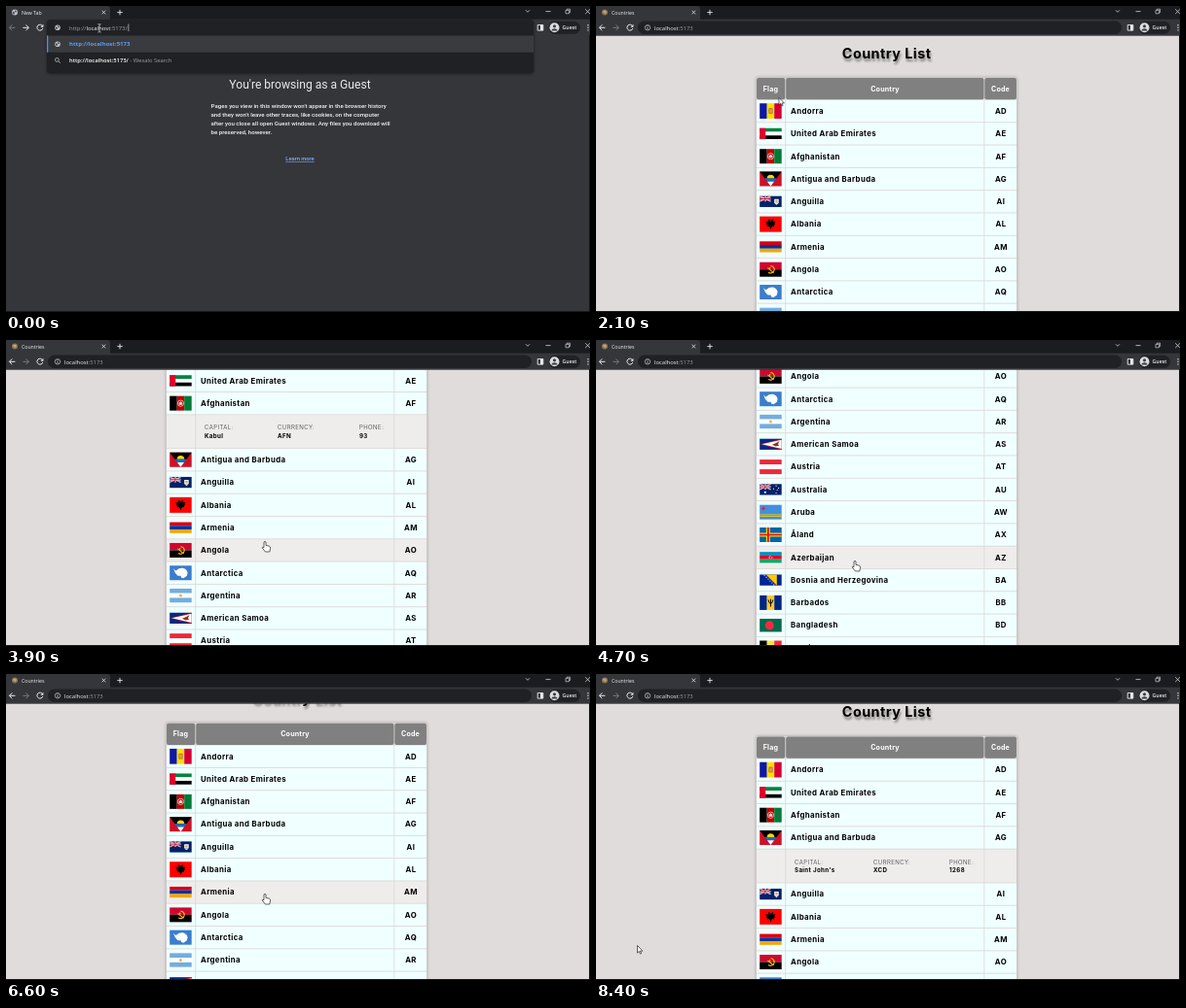
An HTML page for the animation above (8.5 s loop, 600 by 315 pixels).

```html
<!DOCTYPE html>
<html lang="en">
<head>
<meta charset="utf-8">
<title>Country List</title>
<style>
  html, body { margin: 0; width: 100%; height: 100%; overflow: hidden; background: #35363a; }
  svg { display: block; width: 100vw; height: 100vh; }
  text { white-space: pre; }
  .ui { font-family: "Open Sans", sans-serif; }
  .guest { font-family: Roboto, sans-serif; font-weight: 500; }
  .app { font-family: Inter, sans-serif; font-weight: 700; }
  .name { font-size: 7.8px; letter-spacing: .38px; }
  .head { font-size: 7.1px; letter-spacing: .2px; fill: #fff; }
  .label { font-size: 6px; letter-spacing: .45px; font-weight: 300; fill: #333; }
  .value { font-size: 6.2px; letter-spacing: .35px; }
  .title { font-size: 14.4px; letter-spacing: .45px; filter: drop-shadow(1.5px 3px 1.3px rgba(0,0,0,.42)); }
  .mid { text-anchor: middle; }
  .line { fill: none; stroke: #e8eaed; stroke-width: .9; }
</style>
</head>
<body>
<svg id="stage" viewBox="0 0 600 315" preserveAspectRatio="none"></svg>
<script>
const LOOP = 8500, ROW = 23.3, FIRST = 96.9, DETAIL = 34.8, PITCH = 13.9;
const AZURE = '#f0ffff', HOVER = '#efecec';

const rect = (fill, x, y, w, h, rx = 0) =>
  `<rect x="${x}" y="${y}" width="${w}" height="${h}" rx="${rx}" fill="${fill}"/>`;
const dot = (fill, x, y, r) => `<circle cx="${x}" cy="${y}" r="${r}" fill="${fill}"/>`;
const shape = (fill, d) => `<path d="${d}" fill="${fill}"/>`;
const line = (d, stroke = '#e8eaed', w = .9) =>
  `<path d="${d}" class="line" style="stroke:${stroke};stroke-width:${w}"/>`;
const text = (s, x, y, cls, attrs = '') => `<text x="${x}" y="${y}" class="${cls}" ${attrs}>${s}</text>`;
const ui = (s, x, y, size, fill, attrs = '') => text(s, x, y, 'ui', `font-size="${size}" fill="${fill}" ${attrs}`);
const group = (id, body) => `<g id="${id}">${body}</g>`;
const tint = (fill, s, weight = 400) => `<tspan fill="${fill}" font-weight="${weight}">${s}</tspan>`;

// Flags are 30 units wide.
const bands = (h, ...cs) => cs.map((c, i) => rect(c, 0, i * h / cs.length, 30, h / cs.length)).join('');
const pales = (h, ...cs) => cs.map((c, i) => rect(c, i * 30 / cs.length, 0, 30 / cs.length, h)).join('');
const jack = line('M0 0L15 7.5M15 0L0 7.5', '#fff', 1.6) + line('M0 0L15 7.5M15 0L0 7.5', '#c8102e', .6) +
  line('M7.5 0V7.5M0 3.75H15', '#fff', 2.4) + line('M7.5 0V7.5M0 3.75H15', '#c8102e', 1.3);
const navy = '#012169';

const countries = [
  ['Andorra', 'AD', 21, pales(21, '#10189f', '#fedd00', '#d50032') + rect('#b5803c', 12, 6.5, 6, 8, 1.5) + rect('#d9a441', 13.3, 8, 3.4, 5)],
  ['United Arab Emirates', 'AE', 15, bands(15, '#00843d', '#fff', '#000') + rect('#e4002b', 0, 0, 8, 15)],
  ['Afghanistan', 'AF', 20, pales(20, '#000', '#be0000', '#007a36') +
    '<circle cx="15" cy="10" r="4.2" fill="none" stroke="#f3d5d0" stroke-width="1"/>' + shape('#f3d5d0', 'M12.5 12V9.5L15 7.5 17.5 9.5V12Z')],
  ['Antigua and Barbuda', 'AG', 20, rect('#ce1126', 0, 0, 30, 20) + shape('#000', 'M0 0H30L23 9.3H7Z') +
    shape('#fcd116', 'M10 9.3A5 5 0 0 1 20 9.3Z') + shape('#0072c6', 'M7 9.3H23L19.7 13.7H10.3Z') + shape('#fff', 'M10.3 13.7H19.7L15 20Z')],
  ['Anguilla', 'AI', 15, rect(navy, 0, 0, 30, 15) + jack + shape('#fff', 'M20 4H26V9Q25 11 23 12Q21 11 20 9Z') +
    dot('#f09a2c', 23, 6.8, 1.7) + rect('#7fc6c9', 20.8, 9, 4.4, 1.3)],
  ['Albania', 'AL', 21.4, rect('#f00', 0, 0, 30, 21.4) +
    shape('#000', 'M15 6L12.5 4 11 5.5 12.5 7.5 8 7 10 9.5 8.5 11 11 12 10 14 13 13.5 15 18 17 13.5 20 14 19 12 21.5 11 20 9.5 22 7 17.5 7.5 19 5.5 17.5 4Z')],
  ['Armenia', 'AM', 15, bands(15, '#d90012', '#0033a0', '#f2a800')],
  ['Angola', 'AO', 20, bands(20, '#cc092f', '#000') + line('M15 5A5 5 0 1 1 12 14', '#ffcb00', 1.5) +
    line('M11 8L19 14.5', '#ffcb00', 1.4) + dot('#ffcb00', 14, 8, 1.1)],
  ['Antarctica', 'AQ', 20, rect('#3a7dce', 0, 0, 30, 20) +
    shape('#fff', 'M5 4L8 7 10 6Q12 3 18 3.3Q24 5 24.5 10L23.5 14 19 17.3 16 16.5 15 14 11 14 7.5 10Z')],
  ['Argentina', 'AR', 19, bands(19, '#74acdf', '#fff', '#74acdf') + dot('#f0b43c', 15, 9.5, 2)],
  ['American Samoa', 'AS', 15, rect('#002b7f', 0, 0, 30, 15) + shape('#ce1126', 'M30 0V15L0 7.5Z') +
    shape('#fff', 'M30 1.3V13.7L3 7.5Z') + shape('#7b3f1d', 'M17 8L21 6.5 27 3.5 25 7.5 27 9 22 10.5Z')],
  ['Austria', 'AT', 20, bands(20, '#ed2939', '#fff', '#ed2939')],
  ['Australia', 'AU', 15, rect(navy, 0, 0, 30, 15) + jack + dot('#fff', 7.5, 11.4, 1.4) +
    [[22.5, 2.5], [19, 6.5], [25.8, 5.6], [22.5, 12.4], [24, 8.3]].map(p => dot('#fff', ...p, .8)).join('')],
  ['Aruba', 'AW', 20, rect('#418fde', 0, 0, 30, 20) + rect('#ffd100', 0, 13, 30, 1.1) + rect('#ffd100', 0, 15.3, 30, 1.1) +
    shape('#d2263c', 'M5 1.5L6 4 8.5 5 6 6 5 8.5 4 6 1.5 5 4 4Z')],
  ['Åland', 'AX', 20, rect('#0064ad', 0, 0, 30, 20) + line('M11.5 0V20M0 10H30', '#ffd300', 5.4) + line('M11.5 0V20M0 10H30', '#da0e15', 2.3)],
  ['Azerbaijan', 'AZ', 15, bands(15, '#0092bc', '#e4002b', '#00ae65') + dot('#fff', 14.4, 7.5, 2) +
    dot('#e4002b', 15, 7.5, 1.6) + dot('#fff', 17, 7.5, .8)],
  ['Bosnia and Herzegovina', 'BA', 15, rect('#002395', 0, 0, 30, 15) + shape('#fecb00', 'M8.5 0H23.5V15Z') +
    [0, 1, 2, 3, 4, 5].map(i => dot('#fff', 6.5 + i * 2.6, 1 + i * 2.6, .8)).join('')],
  ['Barbados', 'BB', 20, pales(20, '#00267f', '#ffc726', '#00267f') + line('M15 5V15.5M11.8 6Q12.5 11 15 11.5Q17.5 11 18.2 6', '#000', 1.3)],
  ['Bangladesh', 'BD', 18, rect('#006a4e', 0, 0, 30, 18) + dot('#f42a41', 13.5, 9, 6)],
  ['Belgium', 'BE', 20, pales(20, '#000', '#fae042', '#ed2939')]
];

const columns = [[165, 29.3], [195.2, 203.3], [399.3, 32.7]];
const cells = (fill, y, h, rx) => columns.map(([x, w]) => rect(fill, x, y, w, h, rx)).join('');

const rowMarkup = ([name, code, h, art], i) => group('row' + i,
  group('bg' + i, cells('inherit', 0, 22.4)) +
  `<g transform="translate(168.2 ${11.2 - h * .375}) scale(.75)">${art}</g>` +
  text(name, 200, 14, 'app name') + text(code, 416, 14, 'app name mid'));

const globe = (x, y, r) => `<g transform="translate(${x} ${y}) scale(${r / 3})">` + dot('#bdc1c6', 0, 0, 3) +
  shape('#4a4b4f', 'M-2.2-1L-.4-.4 0 .8-1 2.2-2.3.8ZM.2-2.4L2 -1.2 1.2.2 0-.8Z') + '</g>';

const guestLines = [
  "Pages you view in this window won't appear in the browser history",
  "and they won't leave other traces, like cookies, on the computer",
  'after you close all open Guest windows. Any files you download will',
  'be preserved, however.'
];
const guestPage = dot('#5f6368', 302, 51, 11) + dot('#bdc1c6', 302, 48, 3.6) + shape('#bdc1c6', 'M295 58Q296 53 302 53Q308 53 309 58Z') +
  text("You're browsing as a Guest", 302, 85.3, 'guest mid', 'font-size="12.1" fill="#e8eaed" style="font-weight:400"') +
  guestLines.map((s, i) => text(s, 210.5, 105 + i * 9, 'guest', 'font-size="6.14" fill="#f1f3f4"')).join('') +
  text('Learn more', 302, 159, 'guest mid', 'font-size="5.75" fill="#7fb0fa" text-decoration="underline"');

const site = rect('#e0dcdb', 0, 30, 600, 285) +
  group('scroll', text('Country List', 0, 53.6, 'app title mid', 'id="title"') +
    group('table',
      '<rect x="164.5" y="73.5" width="268" height="640" rx="2" fill="#dcd9d8" style="filter:drop-shadow(0 0 1.5px rgba(0,0,0,.3))"/>' +
      cells('#808080', 74, 22.2, 2) + ['Flag', 'Country', 'Code'].map((s, i) => text(s, [179.5, 297, 415.5][i], 87.6, 'app head mid')).join('') +
      countries.map(rowMarkup).join('') +
      group('detail', cells(HOVER, 0, 34) +
        ['CAPITAL:', 'CURRENCY:', 'PHONE:'].map((s, i) =>
          group('col' + i, text(s, 0, 15.2, 'app label') + text('', 0, 23.5, 'app value', `id="val${i}"`))).join('')))) +
  '<clipPath id="window"><rect x="280" y="88" width="42.6" height="15"/></clipPath><g clip-path="url(#window)">' +
  group('loader', [-1, 0, 1, 2].map(i => dot('#808080', 287 + i * PITCH, 95.4, 5.9)).join('')) + '</g>';

const chrome = rect('#1b1c1f', 0, 0, 600, 14) + shape('#35363a', 'M0 14V0H104Q107 0 107 3V14Z') + rect('#35363a', 0, 13.7, 600, 17) +
  group('globeIcon', globe(9, 6.6, 3)) +
  group('earthIcon', dot('#8a7557', 9, 6.6, 3) + shape('#c0a77c', 'M7 5.4L9 4.6 11 6 9.6 8 7.6 6.8Z')) +
  group('spinner', line('M9 3.8A2.8 2.8 0 1 1 6.2 6.6', '#9aa0a6', .8)) +
  ui('', 16, 8.5, 5.2, '#f1f3f4', 'id="tab" font-weight="500"') +
  line('M98.6 4.7L102.2 8.3M102.2 4.7L98.6 8.3', '#e8eaed', .8) + line('M117 3.9V9.3M114.3 6.6H119.7') +
  line('M534 4.3L536 6.3 538 4.3M554.5 5.6H559.5M595.2 3.3L600 8.1M600 3.3L595.2 8.1', '#d0d2d5', .8) +
  line('M575 4.4H578.4V7.8H575ZM576.2 4.2V3.2H579.6V6.6H578.6', '#d0d2d5', .7) +
  group('back', line('M9.4 22.3H3.6M6.3 19.4L3.4 22.3 6.3 25.2', 'inherit', 1)) +
  group('next', line('M17.4 22.3H23.2M20.5 19.4L23.4 22.3 20.5 25.2', 'inherit', 1)) +
  group('reload', line('M37.6 20.8A3 3 0 1 0 37.8 23', '#e8eaed', 1) + shape('#e8eaed', 'M38.4 18.8V21.8H35.4Z')) +
  group('stop', line('M32.3 19.6L37.7 25M37.7 19.6L32.3 25', '#e8eaed', 1)) +
  rect('#202124', 43, 15.6, 497, 13.4, 6.7) +
  '<circle cx="53" cy="22.3" r="2.7" class="line" style="stroke-width:.6"/>' + line('M53 21.7V23.9M53 20.4V21.1', '#e8eaed', .7) +
  ui(tint('#f1f3f4', 'localhost', 500) + tint('#9aa0a6', ':5173'), 60, 24.5, 5.9, '#fff') +
  line('M546.2 19.5H551.8V25.1H546.2Z') + rect('#e8eaed', 549, 19.5, 2.8, 5.6) +
  rect('#202124', 557.5, 15.8, 32.5, 13, 6.5) + dot('#dadce0', 563.5, 22.3, 5) + dot('#3c4043', 563.5, 20.8, 1.6) +
  shape('#3c4043', 'M560.2 25.6Q560.8 23.2 563.5 23.2Q566.2 23.2 566.8 25.6Z') +
  ui('Guest', 571.6, 24.2, 5.2, '#f1f3f4', 'font-weight="600"') + [19.7, 22.3, 24.9].map(y => dot('#e8eaed', 598, y, .7)).join('');

const dropdown = '<rect x="42" y="14.3" width="500" height="54.5" rx="3" fill="#202124" style="filter:drop-shadow(0 1px 1.5px rgba(0,0,0,.5))"/>' +
  rect('#3a3b3f', 42, 30.5, 500, 17.2) + rect('#4a90f5', 42, 30.5, 1.3, 17.2) + globe(53, 22.3, 2.8) + globe(53, 39.2, 2.8) +
  ui(tint('#9aa0a6', 'http://') + tint('#f1f3f4', 'localhost', 500) + tint('#9aa0a6', ':5173/'), 65, 24.5, 5.95, '#fff') +
  rect('#e8eaed', 125.6, 18.5, .6, 7.6) +
  ui('http://localhost:5173', 65, 41.3, 6, '#5f9df8', 'font-weight="700"') +
  line('M54 57L55.8 58.8', '#bdc1c6', .8) + '<circle cx="52.4" cy="55.4" r="1.9" class="line" style="stroke:#bdc1c6;stroke-width:.8"/>' +
  ui(tint('#fff', 'http://localhost:5173/', 600) + tint('#9aa0a6', ' - Wexalo Search'), 65, 58.2, 5.85, '#fff');

const pointer = (id, d) => group(id, `<path d="${d}" fill="#fff" stroke="#222" stroke-width=".7" stroke-linejoin="round"/>`);
const cursors = pointer('hand', 'M-1 1Q0-.5 1 1V4.4L4.4 5.2Q5.8 5.6 5.6 7.2L4.8 11H.4L-2.8 6.9Q-2.6 5.4-1 6.6Z') +
  pointer('arrow', 'M0 0V7.6L1.8 6 3 8.6 4.1 8.1 3 5.6H5.4Z') +
  group('beam', line('M-1.6-3.4Q0-3.4 0-2.6Q0-3.4 1.6-3.4M0-2.8V4.4M-1.6 5Q0 5 0 4.2Q0 5 1.6 5', '#c8cacd', .8));

document.getElementById('stage').innerHTML =
  rect('#35363a', 0, 0, 600, 315) + group('guest', guestPage) + group('site', site) + chrome + group('dropdown', dropdown) +
  rect('#17181a', 0, 314, 600, 1) + rect('#17181a', 599, 30, 1, 285) + group('cursor', cursors);

const el = id => document.getElementById(id);
const show = (id, on) => el(id).style.display = on ? '' : 'none';
const move = (id, x, y) => el(id).setAttribute('transform', `translate(${x} ${y})`);

function track(keys, t) {
  const i = keys.findIndex(k => k[0] > t);
  if (i < 0) return keys.at(-1).slice(1);
  if (!i) return keys[0].slice(1);
  const a = keys[i - 1], b = keys[i], p = (t - a[0]) / (b[0] - a[0]);
  return a.slice(1).map((v, j) => v + (b[j + 1] - v) * p);
}

const mouse = [[1850, 96, 22], [2000, 140, 60], [2200, 235, 128], [2400, 274, 155], [3300, 274, 155], [3600, 266, 207],
  [4500, 266, 207], [4700, 266, 227], [6500, 266, 226], [6850, 266, 226], [7200, 290, 170], [7450, 290, 170],
  [7800, 518, 110], [7900, 518, 110], [8100, 400, 120], [8200, 290, 122], [8400, 42.5, 279.5]];
const scrolling = [[3400, 0], [3550, 20], [3750, 74], [3900, 89.5], [4000, 93.8], [4100, 93.8], [4250, 135],
  [4450, 225], [4600, 260], [4700, 268.6]];
const scrollUp = [[5900, 233.8], [6000, 218], [6450, 62], [6600, 23.4], [6750, 12], [6850, 9.5]];

// [start, row, capital, currency, phone, currency x]
const opened = [
  [2500, 2, 'Kabul', 'AFN', '93', 279],
  [4900, 15, 'Baku', 'AZN', '994', 279],
  [7350, 3, "Saint John's", 'XCD', '1268', 285]
];

function update(t) {
  const loading = t >= 300 && t < 1000, loaded = t >= 1000, listed = t >= 1600;
  show('dropdown', t < 300);
  show('guest', t < 500);
  show('site', loaded);
  show('table', listed);
  show('loader', !listed);
  show('spinner', loading);
  show('globeIcon', !loading && t < 1900);
  show('earthIcon', t >= 1900);
  show('stop', loading);
  show('reload', !loading);
  el('spinner').setAttribute('transform', `rotate(${t * .36} 9 6.6)`);
  el('tab').textContent = t < 300 ? 'New Tab' : loaded ? 'Countries' : 'localhost:5173';
  el('back').style.stroke = t < 500 ? '#77797d' : '#e8eaed';
  el('next').style.stroke = t < 500 ? '#e8eaed' : '#77797d';
  move('loader', Math.max(0, t - 950) * PITCH * .003 % PITCH, 0);
  el('title').setAttribute('x', listed ? 298.6 : 302.6);

  const [scroll] = track(t < 4900 ? scrolling : scrollUp, t);
  const [x, y] = track(mouse, t);
  move('scroll', 0, -scroll);

  const open = opened.findLast(o => t >= o[0]);
  const openRow = open ? open[1] : countries.length;
  let overRow = false;
  countries.forEach((c, i) => {
    const top = FIRST + i * ROW + (i > openRow ? DETAIL : 0);
    const over = y > 31 && x > 165 && x < 432 && y >= top - scroll && y < top - scroll + ROW;
    overRow ||= over;
    move('row' + i, 0, top);
    el('bg' + i).setAttribute('fill', over ? HOVER : AZURE);
  });
  show('detail', open);
  if (open) {
    move('detail', 0, FIRST + (openRow + 1) * ROW);
    [204, open[5], 363].forEach((cx, i) => {
      move('col' + i, cx, 0);
      el('val' + i).textContent = open[i + 2];
    });
  }

  move('cursor', x, y);
  show('beam', y < 30);
  show('hand', listed && overRow);
  show('arrow', y >= 30 && !(listed && overRow));
}

const start = performance.now();
function tick() {
  update((performance.now() - start) % LOOP);
  requestAnimationFrame(tick);
}
tick();
</script>
</body>
</html>
```
